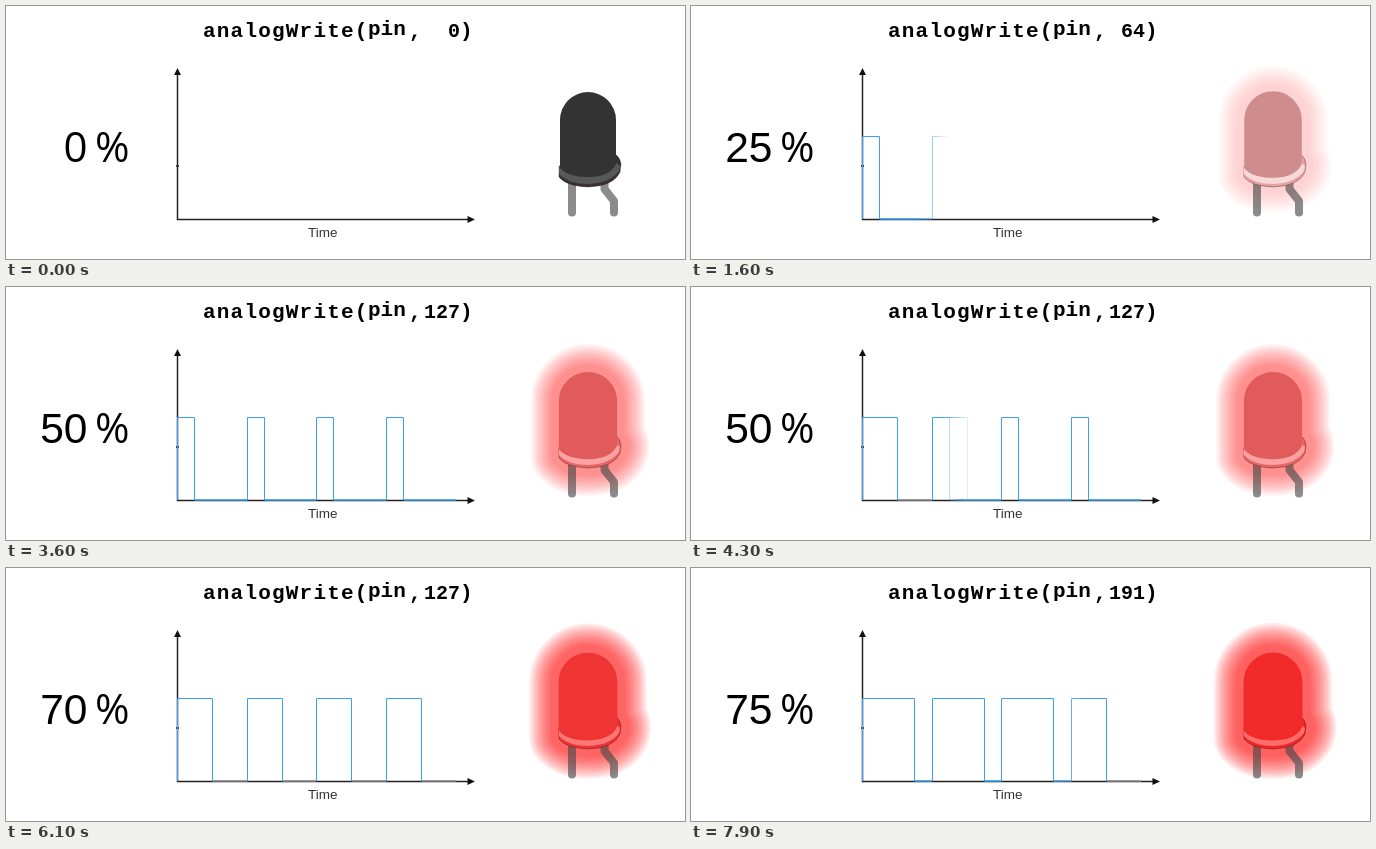
Animation of 679 by 253 pixels, one loop 8 s. Source, as an HTML page:

```html
<!DOCTYPE html>
<html lang="en">
<head>
<meta charset="utf-8">
<title>PWM duty cycle</title>
<style>
  html, body { margin: 0; width: 100%; height: 100%; overflow: hidden; background: #fff; }
  svg { display: block; width: 679px; height: 253px; }
  .code { font: bold 20px "Liberation Mono", "Courier New", monospace; }
  .call { font-size: 21px; letter-spacing: 1.2px; }
  .arg { font-size: 21px; }
  .digits { font: 42.5px "Liberation Sans", Arial, sans-serif; }
  .open { font: 42px "Open Sans", "Noto Sans", sans-serif; }
  .label { font: 13.5px "Liberation Sans", Arial, sans-serif; fill: #333; }
</style>
</head>
<body>
<svg viewBox="0 0 679 253" xmlns="http://www.w3.org/2000/svg">
  <defs>
    <linearGradient id="fadeOut" gradientUnits="userSpaceOnUse" x1="-32" x2="0" y1="0" y2="0">
      <stop offset="0" stop-color="#fff"/><stop offset="1" stop-color="#000"/>
    </linearGradient>
    <linearGradient id="fadeIn" gradientUnits="userSpaceOnUse" x1="-32" x2="-8" y1="0" y2="0">
      <stop offset="0" stop-color="#000"/><stop offset="1" stop-color="#fff"/>
    </linearGradient>
    <mask id="newMask" maskUnits="userSpaceOnUse" x="0" y="0" width="679" height="253">
      <rect width="679" height="253" fill="url(#fadeOut)"/>
    </mask>
    <mask id="oldMask" maskUnits="userSpaceOnUse" x="0" y="0" width="679" height="253">
      <rect width="679" height="253" fill="url(#fadeIn)"/>
    </mask>
  </defs>

  <g class="code">
    <text class="call" x="197" y="31">analogWrite(</text>
    <text class="arg" x="362" y="29">pin</text>
    <text class="arg" x="403" y="31">,</text>
    <text id="value" x="454" y="31" text-anchor="end">0</text>
    <text class="call" x="454" y="31">)</text>
  </g>

  <text id="percent" x="81.5" y="155.5" text-anchor="end" class="open">0</text>
  <text x="89" y="155.5" class="open">%</text>

  <path d="M171.5 66V213.5H465M170 160h3" fill="none" stroke="#222" stroke-width="1.5"/>
  <path d="M171.5 62l3.5 7h-7zM469 213.5l-7.5 -3.5v7z" fill="#111"/>
  <text class="label" x="302" y="231">Time</text>
  <g mask="url(#oldMask)"><g id="oldWave"></g></g>
  <g mask="url(#newMask)"><g id="newWave"></g></g>

  <g id="glow" fill="none" stroke="#f00" stroke-linejoin="round"></g>
  <g fill="none" stroke="#484848" stroke-opacity=".63" stroke-width="8" stroke-linecap="round" stroke-linejoin="round">
    <path d="M566 176V206.5"/>
    <path d="M598.5 177V183L608 195V206.5"/>
  </g>
  <path id="base" stroke="#500" stroke-opacity=".45" stroke-width=".8" d="M553 160V171Q560 180 582 181Q608 180 614 166L615 158Q614 151 609 148Z"/>
  <path id="rim" d="M553 160V168Q562 178 583 178Q604 177 613 165L614 160L609 156Z"/>
  <path id="bulb" stroke-linejoin="round" d="M554 114A28 28 0 0 1 610 114V158Q604 171 582 171Q562 171 554 162Z"/>
</svg>
<script>
const LOOP = 8000, STEP = 100, RINGS = 12, RAMP = 400;
const LEFT = 171, PERIOD = 69.6, PULSES = 4, END = 450;
const BLUE = '#3a9ff5', GREY = '#8a8a8a';
const $ = id => document.getElementById(id);

// ramp: when the duty starts to rise; front: [time, x] points of the sweeping edge
const phases = [
  { duty: 0, value: 0, ramp: 0, front: [[0, 0], [LOOP, 0]] },
  { duty: 25, value: 64, ramp: 950, front: [[1000, 165], [1600, 258], [2800, 403]] },
  { duty: 50, value: 127, ramp: 3150, front: [[3500, 165], [4300, 282], [5700, 482]] },
  { duty: 75, value: 191, ramp: 5750, front: [[6200, 165], [7000, 302], [7900, 400]] }
];

const clamp = k => Math.min(1, Math.max(0, k));

// Linear between points, continuing along the last segment
function along(points, t) {
  let i = 1;
  while (i < points.length - 1 && points[i][0] < t) i++;
  const [t0, x0] = points[i - 1], [t1, x1] = points[i];
  return x0 + (x1 - x0) * (t - t0) / (t1 - t0);
}

function dutyAt(t) {
  const raw = phases.reduce((d, p) => d + (p.duty - d) * clamp((t - p.ramp) / RAMP), 0);
  return Math.round(raw / 5) * 5;
}

function drawWave(duty) {
  if (!duty) return '';
  const rise = i => Math.round(LEFT + PERIOD * i) + .5;
  let high = '', low = '';
  for (let i = 0; i < PULSES; i++) {
    const fall = rise(i) + Math.round(PERIOD * duty / 100);
    high += `M${rise(i)} 213V130.5H${fall}V213`;
    low += `M${fall} 213H${i < PULSES - 1 ? rise(i + 1) : END}`;
  }
  return `<path d="${low}" fill="none" stroke="${duty === 50 ? GREY : BLUE}" stroke-width="1.5"/>` +
    `<path d="${high}" fill="none" stroke="${BLUE}"/>`;
}

const outline = 'M554 114A28 28 0 0 1 610 114V149Q618 158 612 168Q604 180 582 180Q562 180 554 170Z';
$('glow').innerHTML = `<path d="${outline}"/>`.repeat(RINGS);
const rings = [...$('glow').children];

function setLed(duty) {
  // Strength runs from 0 at 25 % to 1 at 75 %; below that the colours wake up from grey
  const k = (duty - 25) / 50, wake = clamp(duty / 25), s = Math.max(0, k);
  const shade = (off, red, cool, drop) =>
    `rgb(${[red, cool - drop * s, cool - drop * s].map(v => Math.round(off + (v - off) * wake))})`;
  $('bulb').setAttribute('fill', shade(51, 207 + 35 * s, 140, 98));
  $('bulb').setAttribute('stroke', $('bulb').getAttribute('fill'));
  $('bulb').setAttribute('stroke-width', wake * (1 + duty * .025));
  $('rim').setAttribute('fill', shade(88, 248 + 7 * s, 216, 108));
  $('base').setAttribute('fill', shade(51, 225 + 10 * s, 165, 125));
  const reach = 25 + duty * .08;
  rings.forEach((ring, i) => {
    ring.setAttribute('stroke-width', 2 * reach * (.3 + .7 * i / (RINGS - 1)));
    ring.setAttribute('stroke-opacity', wake * (.017 + .062 * s));
  });
}

let shown = -1;
function setPhase(n) {
  if (n === shown) return;
  shown = n;
  $('oldWave').innerHTML = drawWave(phases[Math.max(n - 1, 0)].duty);
  $('newWave').innerHTML = drawWave(phases[n].duty);
  $('value').textContent = phases[n].value;
}

function render(ms) {
  const t = Math.floor(ms % LOOP / STEP) * STEP;
  const n = phases.filter(p => p.front[0][0] <= t).length - 1;
  const duty = dutyAt(t);
  setPhase(n);
  const shift = `translate(${along(phases[n].front, t)} 0)`;
  $('fadeOut').setAttribute('gradientTransform', shift);
  $('fadeIn').setAttribute('gradientTransform', shift);
  $('percent').textContent = duty;
  $('percent').setAttribute('class', duty ? 'digits' : 'open');
  setLed(duty);
}

const start = performance.now();
function tick() {
  render(performance.now() - start);
  requestAnimationFrame(tick);
}
tick();
</script>
</body>
</html>
```
